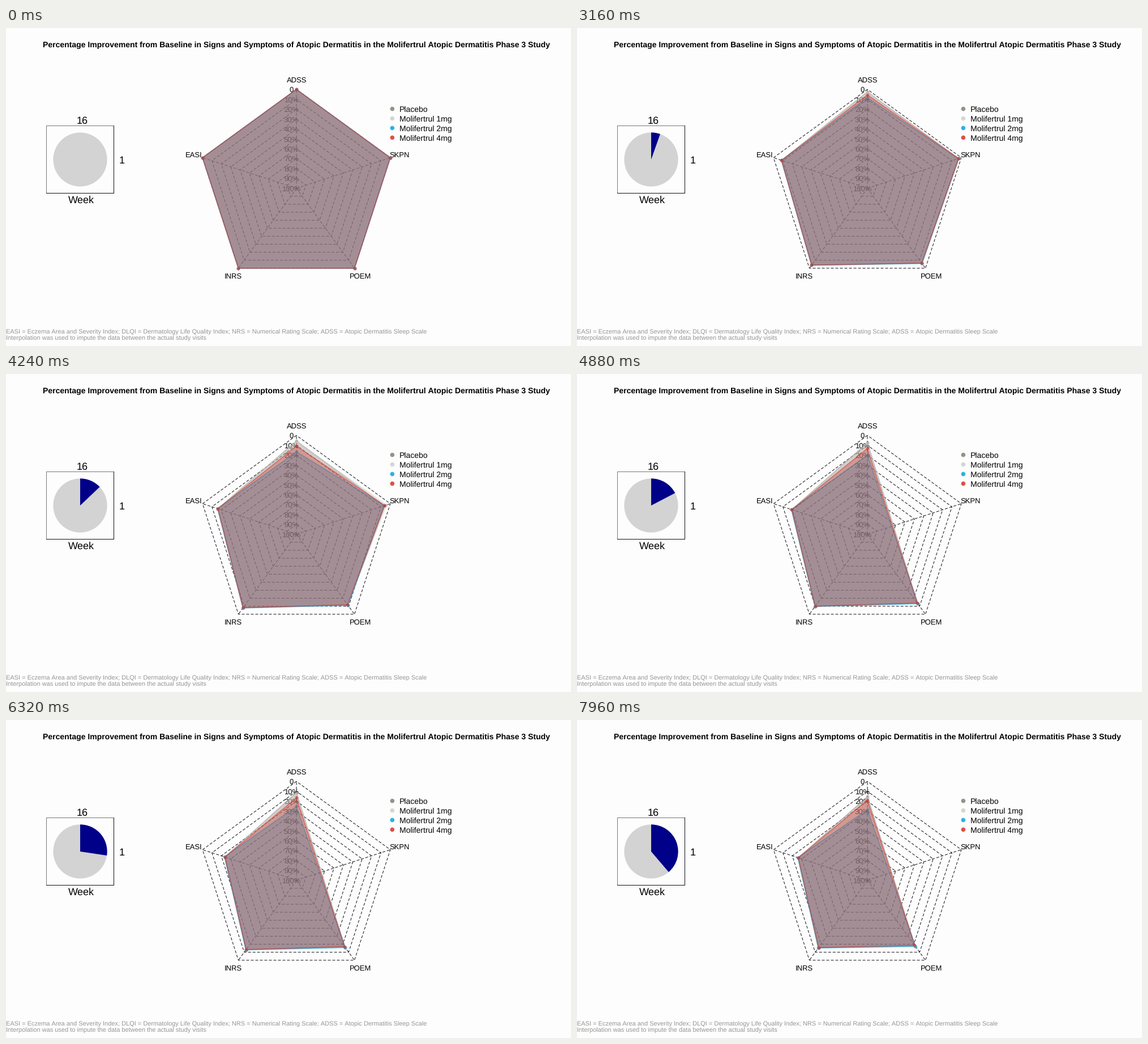
Animation, 998 px wide and 561 px high, one loop 8000 ms. Source, as a matplotlib script:

```python
import matplotlib.pyplot as plt
import numpy as np
from matplotlib.animation import FuncAnimation
from matplotlib.colors import to_rgba
from matplotlib.patches import Circle, Polygon, Wedge

W, H, DPI = 998, 561, 64
PX = 72 / DPI
FRAMES, INTERVAL = 200, 40
START = 59.5        # frame where week counting begins
SKPN_END = 108      # no skin pain readings from here on

plt.rcParams.update({
    "font.family": "Liberation Sans",
    "text.hinting": "none",
    "text.hinting_factor": 1,
    "lines.scale_dashes": False,
    "path.snap": False,
})

CENTRE = np.array([513, 282.7])
RADIUS = 174.4
AXES = ["ADSS", "EASI", "INRS", "POEM", "SKPN"]
ANGLES = np.radians(90 + 72 * np.arange(5))
DIRS = np.column_stack([np.cos(ANGLES), -np.sin(ANGLES)])
LABEL_AT = [(513.5, 91.5), (331.5, 223.5), (401, 437.5), (626, 437.5), (695.5, 223.5)]

DRUG = "Molifertrul"
CLOCK, CLOCK_R = (131, 232), 47.6

# Name, colour, inward shift per axis (px) at the last frame, ADSS time constant
ARMS = [
    ("Placebo", "#82786f", [27, 46, 27.5, 31, 22], 500),
    (f"{DRUG} 1mg", "#cdcdcb", [29, 46, 27, 31, 14], 500),
    (f"{DRUG} 2mg", "#00a1de", [50, 45, 26.5, 30, 22], 65),
    (f"{DRUG} 4mg", "#d52b1e", [33, 46, 27.5, 32.5, 20], 65),
]
OTHER_TAUS = [55, 90, 50, 90]

fig = plt.figure(figsize=(W / DPI, H / DPI), dpi=DPI, facecolor="#fdfdfd")
ax = fig.add_axes([0, 0, 1, 1])
ax.set_xlim(0, W)
ax.set_ylim(H, 0)
ax.axis("off")


def label(x, y, text, size, ha="center", color="black", weight="normal"):
    """Write text whose capitals are centred on y."""
    ax.text(x, y + 0.36 * size, text, size=size * PX, ha=ha, va="baseline",
            color=color, weight=weight, zorder=3)


def line(points, color="#101018", dashed=False):
    xs, ys = np.transpose(points)
    style = (0, (5 * PX, 3 * PX)) if dashed else "-"
    ax.plot(xs, ys, color=color, lw=PX, ls=style, zorder=2,
            dash_capstyle="butt", solid_capstyle="butt")


def draw_texts():
    label(513, 28.5, "Percentage Improvement from Baseline in Signs and Symptoms of "
          f"Atopic Dermatitis in the {DRUG} Atopic Dermatitis Phase 3 Study",
          14.04, weight="bold")
    grey = "#969696"
    label(0, 536, "EASI = Eczema Area and Severity Index; DLQI = Dermatology Life "
          "Quality Index; NRS = Numerical Rating Scale; ADSS = Atopic Dermatitis "
          "Sleep Scale", 10.96, "left", grey)
    label(0, 547, "Interpolation was used to impute the data between the actual "
          "study visits", 10.96, "left", grey)


def draw_grid():
    for ring in range(1, 11):
        pts = CENTRE + DIRS * RADIUS * ring / 10
        line(np.vstack([pts, pts[:1]]), dashed=True)
    for d in DIRS:
        line([CENTRE, CENTRE + d * RADIUS], dashed=True)
    for i in range(11):
        y = CENTRE[1] - RADIUS * (1 - i / 10) + 0.3
        label(504, y, f"{10 * i}%" if i else "0", 13)
    for name, (x, y) in zip(AXES, LABEL_AT):
        label(x, y, name, 13)


def draw_legend():
    for i, (name, color, *_) in enumerate(ARMS):
        y = 142.7 + 16.9 * i
        ax.add_patch(Circle((682.3, y), 3.8, fc=color, alpha=0.82, lw=0))
        label(695, y + 0.5, name, 14, "left")


def draw_clock():
    line([(71.5, 292), (71.5, 172.5), (190.5, 172.5)], "#777777")
    line([(190.5, 172), (190.5, 291.5), (71, 291.5)])
    ax.add_patch(Circle(CLOCK, CLOCK_R, fc="#d3d3d3", lw=0))
    label(135, 163, "16", 17.5)
    label(204.5, 233, "1", 17.5)
    label(133, 302.7, "Week", 17.5)


def corners(arm, frame):
    """Each corner moves inward along its axis and slowly levels off."""
    _, _, ends, adss_tau = ARMS[arm]
    taus = np.array([adss_tau] + OTHER_TAUS)
    elapsed = max(0, frame - START)
    total = FRAMES - 1 - START
    eased = (1 - np.exp(-elapsed / taus)) / (1 - np.exp(-total / taus))
    pts = CENTRE + DIRS * (RADIUS - ends * eased)[:, None]
    return pts if frame < SKPN_END else pts[:4]


draw_texts()
draw_grid()
draw_legend()
draw_clock()

hand = ax.add_patch(Wedge(CLOCK, CLOCK_R, -90, -90, fc="#000088", lw=0, zorder=3))
shapes, dots = [], []
for k, (_, color, *_) in enumerate(ARMS):
    shapes.append(ax.add_patch(Polygon(
        CENTRE + DIRS, closed=True, fc=to_rgba(color, 0.33), ec=to_rgba(color, 0.5),
        lw=1.7 * PX, joinstyle="round", zorder=10 + k)))
    dots += ax.plot([], [], "o", ms=5.8 * PX, mec="none", mfc=to_rgba(color, 0.55),
                    zorder=10.5 + k)


def update(frame):
    angle = max(0, frame - START)
    hand.set_visible(angle > 0.5)
    hand.set_theta2(-90 + angle)
    for arm, (shape, dot) in enumerate(zip(shapes, dots)):
        pts = corners(arm, frame)
        shape.set_xy(pts)
        dot.set_data(*pts.T)
    return [hand, *shapes, *dots]


anim = FuncAnimation(fig, update, frames=FRAMES, interval=INTERVAL,
                     repeat=True, repeat_delay=0, blit=False)
plt.show()
```
